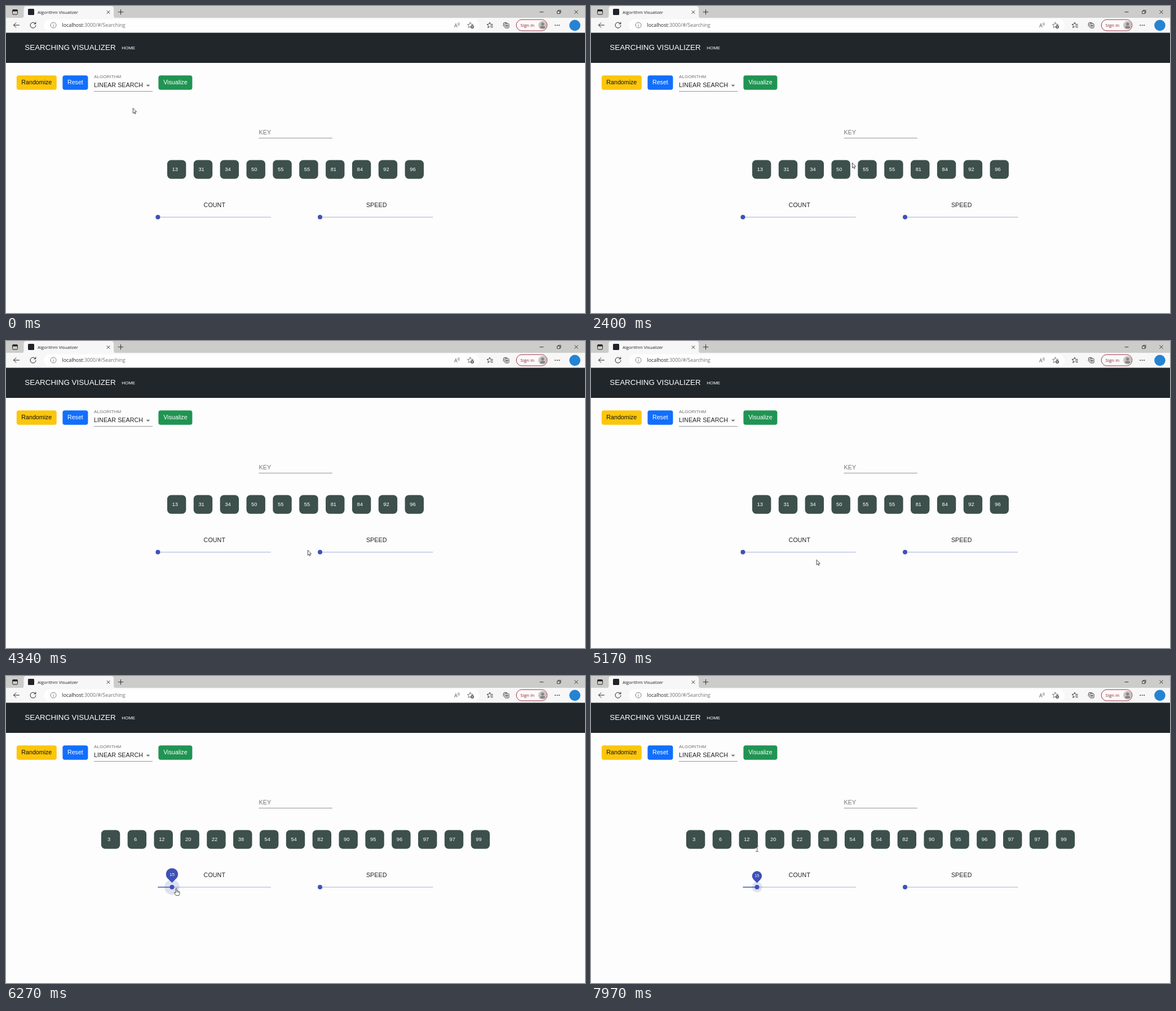
An HTML page with a canvas that plays this animation: 1027 px wide and 545 px high, repeating every 8 s.

```html
<!DOCTYPE html>
<html lang="en">
<head>
<meta charset="utf-8">
<title>Searching Visualizer</title>
<style>
html, body { margin: 0; width: 100%; height: 100%; overflow: hidden; background: #fdfdfd; }
canvas { display: block; width: 1027px; height: 545px; }
</style>
</head>
<body>
<canvas id="stage"></canvas>
<script>
const W = 1027, H = 545, LOOP = 8000;
const canvas = document.getElementById('stage');
const ctx = canvas.getContext('2d');
const dpr = window.devicePixelRatio || 1;
canvas.width = W * dpr;
canvas.height = H * dpr;

const PAGE = '"Liberation Sans", Arial, sans-serif';
const CHROME = '"Open Sans", "Noto Sans", sans-serif';
const INDIGO = '#3f51b5';
const SMALL = [13, 31, 34, 50, 55, 55, 81, 84, 92, 96];
const LARGE = [3, 6, 12, 20, 22, 38, 54, 54, 82, 90, 95, 96, 97, 97, 99];
const PITCH = 46.85, TILE = 33.4, TILE_Y = 273.5;
const COUNT_X = 269.4, SPEED_X = 557, TRACK_Y = 374.8, TRACK_W = 200.3;

// Pointer path: time, x, y
const PATH = [
  [0, 225, 181], [1500, 225, 181], [2400, 463, 278], [3140, 552.5, 371],
  [3340, 553, 373], [3670, 554, 376], [4100, 554, 376], [4340, 535, 371],
  [4640, 535, 371], [5170, 400, 388], [5440, 348, 387], [5750, 272, 376],
  [5950, 272, 376], [6270, 302, 377], [6410, 303, 377], [6640, 303, 377],
  [7340, 297, 377], [7570, 297, 377], [7970, 294.7, 307], [8000, 294.7, 305]
];

function rect(x, y, w, h, color, r = 0) {
  ctx.fillStyle = color;
  ctx.beginPath();
  ctx.roundRect(x, y, w, h, r);
  ctx.fill();
}

function disc(x, y, r, color) {
  ctx.fillStyle = color;
  ctx.beginPath();
  ctx.arc(x, y, r, 0, Math.PI * 2);
  ctx.fill();
}

function text(s, x, y, size, color, { font = PAGE, align = 'left', gap = 0 } = {}) {
  ctx.font = `${size}px ${font}`;
  ctx.textAlign = align;
  ctx.letterSpacing = gap + 'px';
  ctx.fillStyle = color;
  ctx.fillText(s, x, y);
}

function stroke(d, color = '#222', width = 1, x = 0, y = 0) {
  ctx.save();
  ctx.translate(x, y);
  ctx.strokeStyle = color;
  ctx.lineWidth = width;
  ctx.lineCap = ctx.lineJoin = 'round';
  ctx.stroke(new Path2D(d));
  ctx.restore();
}

function fillStroke(d, x, y, fill, line, width) {
  ctx.save();
  ctx.translate(x, y);
  const p = new Path2D(d);
  ctx.fillStyle = fill;
  ctx.fill(p);
  ctx.strokeStyle = line;
  ctx.lineWidth = width;
  ctx.lineJoin = 'round';
  ctx.stroke(p);
  ctx.restore();
}

function smooth(t, start, length = 150) {
  const p = Math.min(1, Math.max(0, (t - start) / length));
  return p * p * (3 - 2 * p);
}

const during = (t, a, b) => smooth(t, a) * (1 - smooth(t, b));

// Monotone cubic interpolation of one path column
function along(t, col) {
  let i = 0;
  while (i < PATH.length - 2 && t >= PATH[i + 1][0]) i++;
  const slope = k => k < 0 || k > PATH.length - 2 ? 0
    : (PATH[k + 1][col] - PATH[k][col]) / (PATH[k + 1][0] - PATH[k][0]);
  const tangent = k => {
    const a = slope(k - 1), b = slope(k);
    return a * b > 0 ? 2 * a * b / (a + b) : 0;
  };
  const h = PATH[i + 1][0] - PATH[i][0], u = (t - PATH[i][0]) / h, v = 1 - u;
  return PATH[i][col] * (1 + 2 * u) * v * v + tangent(i) * h * u * v * v
    + PATH[i + 1][col] * u * u * (3 - 2 * u) - tangent(i + 1) * h * u * u * v;
}

function browser() {
  rect(0, 0, W, 21.5, '#cccccb');
  rect(0, 21, W, 26.5, '#f7f7f7');
  ctx.fillStyle = '#f7f7f7';
  ctx.fill(new Path2D('M27 21.5Q31.5 21.5 31.5 17V5Q31.5 0 36.5 0H186Q191 0 191 5V17Q191 21.5 195.5 21.5Z'));

  stroke('M13 6.7H19Q20.5 6.7 20.5 8.2V13.5Q20.5 15 19 15H13Q11.5 15 11.5 13.5V8.2Q11.5 6.7 13 6.7Z');
  rect(11.5, 6.5, 9, 3, '#222', 1);
  rect(39, 5, 11, 11, '#20232a', 1.5);
  text('Algorithm Visualizer', 56, 13.5, 7.75, '#222', { font: CHROME });
  stroke('M179 8.5L184 13.5M184 8.5L179 13.5', '#222', 0.9);
  stroke('M199.2 10.7H207.8M203.5 6.4V15', '#222', 0.9);
  stroke('M947 10.7H953', '#222', 0.9);
  stroke('M978 9H982.5V13.5H978ZM979.5 9V7.5H984V12H982.5', '#222', 0.8);
  stroke('M1008.7 7.8L1014.3 13.4M1014.3 7.8L1008.7 13.4', '#222', 0.9);

  stroke('M23.5 34H13.5M17.8 29.7L13.5 34L17.8 38.3');
  stroke('M52.3 31.5A5 5 0 1 0 53 34.6M52.8 28.8V31.8H49.8');
  rect(67, 23.5, 773, 21.5, '#fefefe', 10.7);
  stroke('M79 34A5 5 0 1 0 89 34A5 5 0 1 0 79 34M84 33.7V36.6M84 31.5V31.6', '#666', 0.8);
  text('localhost', 99.5, 37.3, 8.85, '#222', { font: CHROME });
  const host = ctx.measureText('localhost').width;
  text(':3000/#/Searching', 99.5 + host, 37.3, 8.85, '#717171', { font: CHROME });

  text('A', 795, 38, 9, '#555', { font: CHROME });
  stroke('M801.5 30.5Q802.8 32 801.5 33.8M803.3 29.3Q805.4 32 803.3 35', '#555', 0.7);
  const star = 'M0 -5L1.5 -1.7L5 -1.3L2.4 1.1L3.1 4.6L0 2.8L-3.1 4.6L-2.4 1.1L-5 -1.3L-1.5 -1.7Z';
  stroke(star, '#555', 0.8, 823.5, 34);
  disc(827, 37, 3, '#555');
  stroke('M825.5 37H828.5M827 35.5V38.5', '#fff', 0.7);
  stroke('M858 36.4L854.8 38.6L855.6 35L853 32.6L856.5 32.2L858 29L859.4 32.2M860 32.6H863.3M859.5 35.2H863.3M860.2 37.8H863.3', '#222', 0.9);
  stroke('M885.5 31.2H890.5Q892 31.2 892 32.7V37.5Q892 39 890.5 39H886.5Q885 39 885 37.5V31.7M883 36.5Q882 36 882.2 34.5L882.7 30.6Q883 29.2 884.5 29.3L888.5 29.7M888.5 33V37.2M886.4 35.1H890.6', '#222', 0.9);

  fillStroke('M913.8 24.2H951.3A10 10 0 0 1 951.3 44H913.8A10 10 0 0 1 913.8 24.2Z', 0, 0, '#fcf9f9', '#9f3147', 1);
  text('Sign in', 912.5, 37, 8, '#852638', { font: CHROME });
  disc(951.8, 34.2, 7.6, '#c5c3c2');
  disc(951.8, 32, 2.6, '#858280');
  rect(947.5, 35.6, 8.6, 4.2, '#858280', [3, 3, 2, 2]);
  for (let i = -1; i <= 1; i++) disc(977.7 + i * 3.5, 34.2, 0.9, '#222');
  disc(1009, 34.4, 9.8, '#2583d3');
}

function button(label, x, w, fill, color) {
  rect(x, 123.3, w, 25.4, fill, 4);
  text(label, x + w / 2, 139.4, 10.67, color, { align: 'center' });
}

function page() {
  rect(0, 47.5, W, 53.5, '#20262a');
  text('SEARCHING VISUALIZER', 33.3, 78.3, 13.38, '#fff');
  text('HOME', 205.2, 77, 8, '#fff');
  button('Randomize', 18.8, 71, '#fcc60b', '#111');
  button('Reset', 100.4, 45, '#126ffc', '#fff');
  button('Visualize', 270.4, 60, '#209453', '#fff');
  text('ALGORITHM', 156, 127.8, 8, '#707070', { gap: 0.08 });
  text('LINEAR SEARCH', 156, 144.2, 10.67, '#222', { gap: 0.1 });
  rect(156, 151, 104, 0.9, '#979797');
  ctx.fillStyle = '#757575';
  ctx.fill(new Path2D('M248.6 139.8H255.4L252 143.2Z'));
  text('KEY', 448.5, 227.7, 10.67, '#757575', { gap: 0.1 });
  rect(448.5, 234, 130.3, 0.9, '#949494');
  text('COUNT', 369.8, 357.3, 10.67, '#222', { align: 'center', gap: 0.1 });
  text('SPEED', 657.2, 357.3, 10.67, '#222', { align: 'center', gap: 0.1 });
}

const tileX = (i, n) => W / 2 + (i - n / 2) * PITCH + 6.7;

function tiles(values) {
  values.forEach((v, i) => {
    const x = tileX(i, values.length);
    rect(x, TILE_Y, TILE, 33.2, '#3d504b', 7);
    text(v, x + 13.8, 293, 9.33, '#fff', { align: 'center' });
  });
}

function slider(x, offset, value, halo, open) {
  rect(x, TRACK_Y - 0.67, TRACK_W, 1.33, '#b4bbe2');
  rect(x, TRACK_Y - 0.67, offset, 1.33, INDIGO);
  const cx = x + offset;
  if (halo > 0) disc(cx, TRACK_Y, 4 + halo, 'rgba(63,81,181,.16)');
  disc(cx, TRACK_Y, 4, INDIGO);
  if (open < 0.01) return;
  ctx.save();
  ctx.translate(cx, 369.2);
  ctx.scale(open, open);
  ctx.translate(0, -17.3);
  ctx.rotate(-Math.PI / 4);
  rect(-10.67, -10.67, 21.33, 21.33, INDIGO, [10.67, 10.67, 10.67, 0]);
  ctx.rotate(Math.PI / 4);
  text(value, 0, 2.7, 8, '#fff', { align: 'center' });
  ctx.restore();
}

function pointer(x, y, n, thumbX) {
  const onTrack = Math.abs(y - TRACK_Y) < 9.5 &&
    [COUNT_X, SPEED_X].some(s => x >= s && x <= s + TRACK_W);
  const onThumb = [thumbX, SPEED_X].some(s => Math.hypot(x - s, y - TRACK_Y) < 14);
  let onTile = false;
  for (let i = 0; i < n; i++) {
    const dx = x - tileX(i, n);
    onTile ||= dx > 0 && dx < TILE && y > TILE_Y && y < 308;
  }
  if (onTrack || onThumb) {
    fillStroke('M-1 1Q-1 0 0 0Q1 0 1 1V4.6Q2.3 4.1 2.8 5.1Q4.1 4.7 4.4 5.7Q5.9 5.5 5.9 7V9.3Q5.9 10.8 4.8 12.6H-0.6Q-1 11.5 -3 9.1Q-4 7.7 -3 7.2Q-2.2 6.9 -1 8.1Z',
      x, y, '#fff', '#222', 0.8);
    stroke('M1 4.8V7M2.8 5.3V7.3M4.4 5.9V7.5', '#222', 0.5, x, y);
  } else if (onTile) {
    stroke('M-2 -5Q0 -5 0 -4Q0 -5 2 -5M0 -4V4M-2 5Q0 5 0 4Q0 5 2 5', '#333', 0.8, x, y);
  } else {
    fillStroke('M0.3 0.4V9.4L2.3 7.5L3.6 10.5L5 9.9L3.7 6.9H6.5Z', x, y, '#fff', '#222', 0.8);
  }
}

function draw(t) {
  ctx.setTransform(dpr, 0, 0, dpr, 0, 0);
  rect(0, 0, W, H, '#fdfdfd');
  const grown = t >= 6060;
  const values = grown ? LARGE : SMALL;
  const offset = grown ? TRACK_W / 8 : 0;
  browser();
  page();
  tiles(values);
  slider(COUNT_X, offset, values.length,
    5.33 * during(t, 5690, 7960) + 4 * during(t, 5930, 6680), during(t, 5690, 7930));
  slider(SPEED_X, 0, 1, 5.33 * during(t, 3060, 4180), during(t, 3060, 4180));
  pointer(along(t, 1), along(t, 2), values.length, COUNT_X + offset);
}

const begin = performance.now();
function tick() {
  draw((performance.now() - begin) % LOOP);
  requestAnimationFrame(tick);
}
tick();
</script>
</body>
</html>
```
